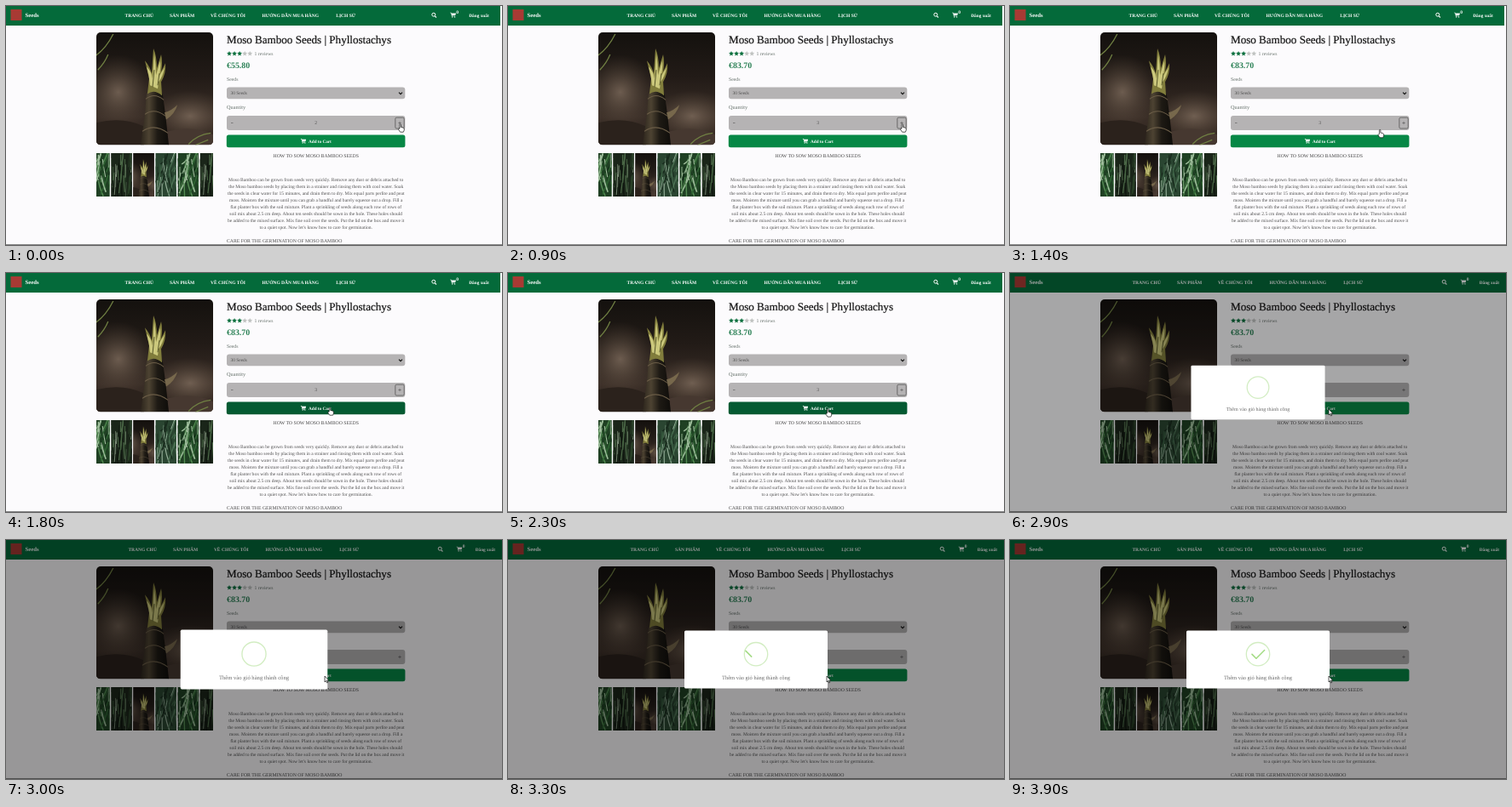
Write an HTML page that moves like this. It is 582x281 px and loops after 4000 ms.

```html
<!DOCTYPE html>
<html lang="vi">
<head>
<meta charset="utf-8">
<title>Seeds</title>
<style>
html, body { margin: 0; width: 100%; height: 100%; overflow: hidden; background: #fcfbfd; }
svg { display: block; }
text { font-family: "Liberation Serif", "Times New Roman", serif; font-size: 5.52px; fill: #505050; text-rendering: geometricPrecision; }
.bold { font-weight: bold; }
.white, .white text { fill: #fff; }
.nav text { font-size: 5.5px; font-weight: bold; }
.mid { text-anchor: middle; }
.head { font-size: 5.75px; fill: #484848; }
.label { fill: #66716b; }
.title { font-size: 13.08px; fill: #141414; stroke: #141414; stroke-width: .2px; }
.price { font-size: 9.9px; fill: #2a8055; }
.field { fill: #b5b3b4; }
.check { fill: none; stroke: #a5dc86; stroke-width: 1.6; stroke-linecap: round; }
.pointer { fill: #fff; stroke: #111; stroke-width: .7; stroke-linejoin: round; }
</style>
</head>
<body>
<svg id="stage" width="582" height="281" viewBox="0 0 582 281">
  <defs>
    <linearGradient id="soil" x2="0" y2="1">
      <stop offset="0" stop-color="#14110e"/>
      <stop offset=".4" stop-color="#221b17"/>
      <stop offset=".75" stop-color="#3a2e27"/>
      <stop offset="1" stop-color="#30251f"/>
    </linearGradient>
    <radialGradient id="haze">
      <stop offset="0" stop-color="#7d6b5c" stop-opacity=".8"/>
      <stop offset="1" stop-color="#5a4a3c" stop-opacity="0"/>
    </radialGradient>
    <linearGradient id="bark">
      <stop offset="0" stop-color="#2c251c"/>
      <stop offset=".3" stop-color="#4d4332"/>
      <stop offset=".6" stop-color="#1e1a14"/>
      <stop offset="1" stop-color="#0f0d0a"/>
    </linearGradient>
    <clipPath id="strip"><rect x="106" y="173" width="137" height="51"/></clipPath>
    <clipPath id="round"><rect x="106" y="31" width="137" height="132.5" rx="5"/></clipPath>
    <symbol id="shoot" viewBox="0 0 137 132" preserveAspectRatio="xMidYMid slice">
      <rect width="137" height="132" fill="url(#soil)"/>
      <ellipse cx="26" cy="70" rx="42" ry="44" fill="url(#haze)"/>
      <ellipse cx="110" cy="98" rx="46" ry="30" fill="url(#haze)"/>
      <path d="M0 106Q30 98 56 110V132H0Z" fill="#2b221c"/>
      <path d="M84 116Q112 108 137 120V132H84Z" fill="#463830"/>
      <path d="M108 131Q118 120 134 118M116 132L131 126M0 27Q12 18 20 2M2 44Q10 36 14 26" fill="none" stroke="#6f7f42" stroke-width="1.3"/>
      <path d="M52 132L57 96 59 72 64 64H74L78 74 81 96 85 132Z" fill="url(#bark)"/>
      <path d="M80 94Q88 92 95 85Q92 96 82 102Z" fill="#77684c"/>
      <path d="M58 78Q68 70 79 79M57 96Q68 88 81 98M54 116Q68 106 84 118" fill="none" stroke="#6b5d47" stroke-width="1"/>
      <path d="M60 72L62 54 57 33Q63 40 65 48L67 19Q71 28 71 42L76 26Q78 36 76 46L81 36Q82 48 76 58L77 74Q68 66 60 72Z" fill="#817d3c"/>
      <path d="M63 62Q62 50 59 40Q65 46 66 54L68 25Q70 38 70 50L75 33Q76 44 73 52L80 41Q78 52 73 58L72 66Z" fill="#cbc87c"/>
      <path d="M66 64L68 44M72 62L74 48" stroke="#4a4a20" stroke-width=".9"/>
    </symbol>
    <symbol id="cart" viewBox="0 0 8 7">
      <path d="M0 0H1.6L2 1H7.8L6.9 4H2.8L3 4.6H6.8V5.3H2.3L1.2 .8H0Z"/>
      <circle cx="3" cy="6.2" r=".8"/><circle cx="6.2" cy="6.2" r=".8"/>
    </symbol>
  </defs>

  <rect width="582" height="281" fill="#fcfbfd"/>
  <rect id="bar" width="580" height="23" fill="#046a3a"/>
  <rect x="5.5" y="4" width="13" height="13" fill="#a83a34"/>
  <text class="bold white" x="22.5" y="13.2" style="font-size:6.7px">Seeds</text>
  <g id="menu" class="nav white">
    <text x="139.5" y="13">TRANG CHỦ</text>
    <text x="192" y="13">SẢN PHẨM</text>
    <text x="240" y="13">VỀ CHÚNG TÔI</text>
    <text x="300.5" y="13">HƯỚNG DẪN MUA HÀNG</text>
    <text x="387.3" y="13">LỊCH SỬ</text>
  </g>
  <g id="tools" class="nav white">
    <path d="M503.3 11.8L505 13.5" stroke="#fff" stroke-width="1.1"/>
    <circle cx="501.8" cy="10.2" r="2" fill="none" stroke="#fff"/>
    <use href="#cart" x="521" y="7.5" width="7.2" height="6.3"/>
    <text x="528.3" y="9">0</text>
    <text x="543.3" y="13" style="font-size:5.3px">Đăng xuất</text>
  </g>

  <g clip-path="url(#round)"><use href="#shoot" x="106" y="31" width="137" height="132.5"/></g>
  <g id="thumbs" clip-path="url(#strip)"></g>

  <text class="title" x="259" y="44.3">Moso Bamboo Seeds | Phyllostachys</text>
  <g id="stars"></g>
  <text class="label" x="291.5" y="58.2" style="font-size:5.7px">1 reviews</text>
  <text class="price bold" id="price" x="259" y="73"></text>
  <text class="label" x="259" y="88" style="font-size:5.8px">Seeds</text>
  <rect class="field" x="259" y="95.5" width="209.3" height="13.7" rx="3"/>
  <text x="263.5" y="104.3" style="font-size:5.4px">30 Seeds</text>
  <path d="M461 101.7L463 103.7 465 101.7" fill="none" stroke="#111" stroke-width="1.2"/>
  <text class="label" x="259" y="121" style="font-size:6.3px">Quantity</text>
  <rect class="field" x="259" y="129" width="209.3" height="17" rx="3"/>
  <path d="M264 137.5H266.5M460.3 137.5H463.7M462 135.8V139.2" stroke="#555" stroke-width=".6"/>
  <text class="mid" id="count" x="363.7" y="139.4"></text>
  <rect id="focus" x="456.8" y="131.2" width="10.4" height="12.8" rx="1.5" fill="none" stroke="#4a4a4a" stroke-width=".7"/>
  <rect id="button" x="258.8" y="151.5" width="209.6" height="14.7" rx="2.5"/>
  <use class="white" href="#cart" x="345.7" y="156" width="6.6" height="5.8"/>
  <text class="bold white" x="355" y="160.8" style="font-size:5.2px">Add to Cart</text>
  <text class="mid head" x="363.7" y="178">HOW TO SOW MOSO BAMBOO SEEDS</text>
  <g id="copy" class="mid"></g>
  <text class="head" x="259" y="278.3">CARE FOR THE GERMINATION OF MOSO BAMBOO</text>
  <rect y="280" width="582" height="1" fill="#858585"/>

  <rect id="shade" width="582" height="281"/>
  <g id="popup">
    <rect x="-84" y="-34" width="168" height="68" rx="1.6" fill="#fff"/>
    <circle cy="-6.3" r="13.7" fill="none" stroke="#a5dc86" stroke-opacity=".5" stroke-width="1.3"/>
    <path class="check" id="tip"/>
    <path class="check" id="long"/>
    <text class="mid" y="23" style="font-size:6.45px;fill:#6a6a6a">Thêm vào giỏ hàng thành công</text>
  </g>
  <path class="pointer" id="hand" d="M-.8 5V.6C-.8-.4 .7-.4 .7 .6V3.4L3.7 4.2 4.4 5V7.2L3.5 9.2H-.2L-2.1 6.5C-2.4 5.6-1.6 5-.8 5Z"/>
  <path class="pointer" id="arrow" transform="translate(374 160)" d="M0 0V7L1.6 5.6 2.6 8 3.7 7.5 2.7 5.2H4.8Z"/>
</svg>
<script>
const $ = id => document.getElementById(id);
const add = (parent, tag, attrs, text) => {
  const el = document.createElementNS("http://www.w3.org/2000/svg", tag);
  for (const k in attrs) el.setAttribute(k, attrs[k]);
  if (text) el.textContent = text;
  return parent.appendChild(el);
};

[
  "Moso Bamboo can be grown from seeds very quickly. Remove any dust or debris attached to",
  "the Moso bamboo seeds by placing them in a strainer and rinsing them with cool water. Soak",
  "the seeds in clear water for 15 minutes, and drain them to dry. Mix equal parts perlite and peat",
  "moss. Moisten the mixture until you can grab a handful and barely squeeze out a drop. Fill a",
  "flat planter box with the soil mixture. Plant a sprinkling of seeds along each row of rows of",
  "soil mix about 2.5 cm deep. About ten seeds should be sown in the hole. These holes should",
  "be added to the mixed surface. Mix fine soil over the seeds. Put the lid on the box and move it",
  "to a quiet spot. Now let's know how to care for germination."
].forEach((line, i) => add($("copy"), "text", { x: 363.7, y: 206.3 + i * 7.93 }, line));

for (let i = 0; i < 5; i++) {
  const points = Array.from({ length: 10 }, (_, k) => {
    const r = k % 2 ? 1.4 : 3.1, a = k * Math.PI / 5;
    return [262 + i * 6.05 + r * Math.sin(a), 56 - r * Math.cos(a)];
  });
  add($("stars"), "polygon", { points: points.join(" "), fill: i < 3 ? "#0a6f3d" : "#bfc2c0" });
}

// Foliage thumbnails: [background, stroke colours, lean, stroke width]
const kinds = {
  leaves: ["#1f4023", ["#2f6433", "#538a52", "#9fbf9c", "#14301a"], 16, 1.2],
  forest: ["#1a2519", ["#2f4a2d", "#0d140d", "#4a6746", "#84957f"], 4, 1],
  stalks: ["#2a4531", ["#4f7657", "#93ad97", "#182b1d", "#3c6244"], 14, 1]
};
function foliage(kind, x) {
  const [bg, colours, lean, width] = kinds[kind];
  let seed = 11;
  const rnd = () => (seed = seed * 16807 % 2147483647) / 2147483647;
  const box = add($("thumbs"), "svg", { x, y: 173, width: 24.7, height: 51 });
  add(box, "rect", { width: 25, height: 51, fill: bg });
  for (let i = 0; i < 56; i++) {
    const px = rnd() * 36 - 4, py = rnd() * 46 - 10, dx = (rnd() - .65) * lean;
    add(box, "path", {
      d: `M${px} ${py}q${dx * .2} 8 ${dx} ${12 + rnd() * 14}`,
      fill: "none", stroke: colours[i % 4], "stroke-width": width * (.4 + rnd())
    });
  }
}
["leaves", "forest", "shoot", "stalks", "leaves", "forest"].forEach((kind, i) => {
  const x = 97 + i * 26.1;
  if (kind === "shoot") add($("thumbs"), "use", { href: "#shoot", x, y: 173, width: 24.7, height: 51 });
  else foliage(kind, x);
});

// CSS "ease" timing curve
function ease(x) {
  let lo = 0, hi = 1;
  for (let i = 0; i < 20; i++) {
    const s = (lo + hi) / 2;
    if (.75 * s * (1 - s) + s ** 3 < x) lo = s; else hi = s;
  }
  return .3 * lo * (1 - lo) ** 2 + 3 * lo * lo * (1 - lo) + lo ** 3;
}

// Eased value between keys given as [time, value, value, ...]
function tween(keys, t) {
  const i = keys.findIndex(k => k[0] > t);
  if (i < 0) return keys[keys.length - 1].slice(1);
  if (i === 0) return keys[0].slice(1);
  const a = keys[i - 1], b = keys[i], p = ease((t - a[0]) / (b[0] - a[0]));
  return a.slice(1).map((v, k) => v + (b[k + 1] - v) * p);
}

const move = [[1300, 462.8, 139], [1750, 380, 158], [2050, 380, 158], [2400, 375, 160]];
const pop = [[0, .7], [.45, 1.05], [.8, .95], [1, 1]];
// Check strokes: time, centre x, centre y, length (in em)
const tipKeys = [[.54, -2.44, -1.16, 0], [.7, -1.31, .4, 3.125], [.84, -.66, .66, 1.06], [1, -.906, .469, 1.5625]];
const longKeys = [[.65, -.375, 1.03, 0], [.84, .78, -.16, 3.4375], [1, .531, .031, 2.9375]];
const EM = 5.2, POP_START = 2847;

function show(el, on) { el.style.display = on ? "" : "none"; }

function stroke(el, keys, t, dir) {
  const [x, y, len] = tween(keys, t).map(v => v * EM);
  const h = Math.max(0, len - 1.6) * Math.SQRT1_2 / 2, cy = y - 6.3;
  el.setAttribute("d", `M${x - h} ${cy - dir * h}L${x + h} ${cy + dir * h}`);
  show(el, len > .05);
}

function render(t) {
  const bought = t >= 2900, count = t < 500 ? 2 : 3;
  const [x, y] = tween(move, t);
  $("count").textContent = count;
  $("price").textContent = "€" + (count * 27.9).toFixed(2);
  show($("focus"), t < 2500);
  $("button").setAttribute("fill", !bought && y > 151.7 ? "#045a32" : "#078846");
  $("hand").setAttribute("transform", `translate(${x} ${y})`);
  show($("hand"), !bought);
  show($("arrow"), bought);
  $("bar").setAttribute("width", bought ? 582 : 580);
  $("menu").setAttribute("transform", `translate(${bought ? 3.9 : 0})`);
  $("tools").setAttribute("transform", `translate(${bought ? 7.4 : 0})`);
  $("shade").setAttribute("opacity", !bought ? 0 : t < 3000 ? .34 : .4);
  show($("popup"), bought);
  if (!bought) return;
  const age = t - POP_START;
  $("popup").setAttribute("transform", `translate(291 140.5) scale(${tween(pop, age / 300)[0]})`);
  stroke($("tip"), tipKeys, age / 750, 1);
  stroke($("long"), longKeys, age / 750, -1);
}

function loop() {
  render(Math.floor(performance.now() % 4000 / 100) * 100);
  requestAnimationFrame(loop);
}
loop();
</script>
</body>
</html>
```
